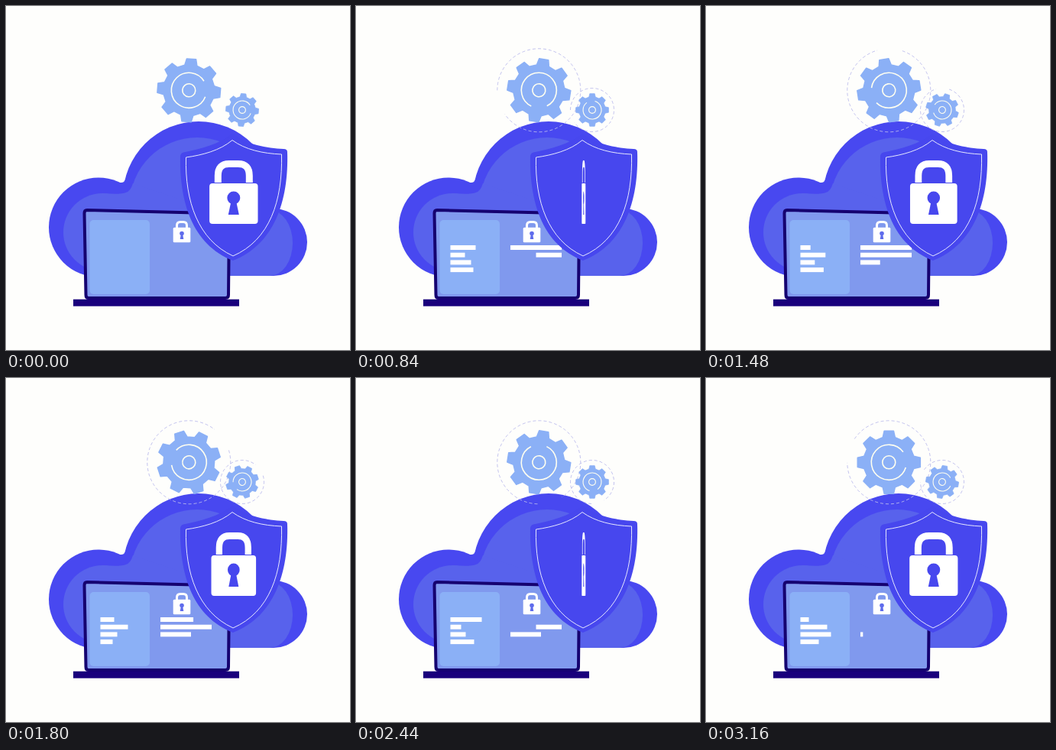
An HTML page that plays this animation: 450x450 px, repeating every 3200 ms.

```html
<!DOCTYPE html>
<html lang="en">
<head>
<meta charset="utf-8">
<title>Cloud security</title>
<style>
  html, body { margin: 0; width: 100%; height: 100%; overflow: hidden; background: #fefefc; }
  svg { display: block; width: 100vw; height: 100vh; }
</style>
</head>
<body>
<svg viewBox="0 0 450 450">
  <g fill="#4848f0">
    <circle cx="121" cy="289.500" r="65"/>
    <circle cx="252" cy="250" r="99"/>
    <circle cx="350" cy="309" r="44"/>
    <path d="M120 353V227Q147 231 151 231Q156 231 158 221L252 250L350 300V353Z"/>
  </g>
  <g fill="#5862ec">
    <circle cx="126" cy="296" r="51"/>
    <circle cx="250" cy="260" r="88"/>
    <ellipse cx="345" cy="310" rx="30" ry="43"/>
    <path d="M126 350V245Q150 247 157 244Q163 242 166 232L250 260L345 290V353H126Z"/>
  </g>

  <g id="gears"></g>

  <path d="M106 267L288 271.500Q292 271.500 292 276L291 378Q291 382 287 382H108Q104.500 382 104.500 378L102.500 271Q102.500 267 106 267Z"
        fill="#8099ee" stroke="#150070" stroke-width="4" stroke-linejoin="round"/>
  <rect x="109.500" y="280" width="78.500" height="97" rx="5" fill="#8bb0f6"/>
  <rect x="88" y="383.700" width="217" height="9" fill="#19007c"/>
  <g id="bars" fill="#fff"></g>
  <g fill="#fff">
    <rect x="218.700" y="289.700" width="22.600" height="19.600" rx="1.500"/>
    <path d="M223.500 291V287Q223.500 282.500 228 282.500H232Q236.500 282.500 236.500 287V291" fill="none" stroke="#fff" stroke-width="3"/>
    <g fill="#5f6cec"><circle cx="230" cy="297.500" r="2.800"/><path d="M229 298H231L232.300 305H227.700Z"/></g>
  </g>

  <path d="M296 167C279 181 254 187 232 191.500Q228 192.500 228 197C227 255 243 312 297 333C351 312 370 255 368 191Q368 187 363 187C342 186 314 181 296 167Z" fill="#4747ee"/>
  <path d="M296 175.500C280 189 257 195 235.500 198C234 255 251 306 297 327C345 306 362 255 360.500 194C336 193 313 188 296 175.500Z"
        fill="none" stroke="#e6e8ff" stroke-width="1"/>

  <g id="lock">
    <rect x="-31.700" y="232" width="63.400" height="53" rx="4" fill="#fff"/>
    <path d="M-20.500 231V222Q-20.500 206.500 -6 206.500H6Q20.500 206.500 20.500 222V231" fill="none" stroke="#fff" stroke-width="9"/>
    <g fill="#4747ee"><circle cy="251" r="8.500"/><path d="M-3 254H3L7 273H-7Z"/></g>
  </g>
</svg>
<script>
const LOOP = 3200, STEP = 40, GROW = 560;
const LOCK_X = 297.8;
const byId = id => document.getElementById(id);

function add(parent, tag, attrs) {
  const node = document.createElementNS("http://www.w3.org/2000/svg", tag);
  for (const key in attrs) node.setAttribute(key, attrs[key]);
  return parent.appendChild(node);
}

const clamp = x => Math.max(0, Math.min(1, x));
const ramp = (t, from, to) => clamp((t - from) / (to - from));

function polar(radius, degrees) {
  const a = degrees * Math.PI / 180;
  return (radius * Math.cos(a)).toFixed(2) + " " + (radius * Math.sin(a)).toFixed(2);
}

function arc(radius, start, sweep) {
  return `M${polar(radius, start)}A${radius} ${radius} 0 ${sweep > 180 ? 1 : 0} 1 ${polar(radius, start + sweep)}`;
}

function gearPath(outer, root, teeth) {
  const points = [];
  for (let i = 0; i < teeth; i++) {
    const mid = i * 360 / teeth - 90;
    points.push(polar(root, mid - 14), polar(outer, mid - 8.5), polar(outer, mid + 8.5), polar(root, mid + 14));
  }
  return "M" + points.join("L") + "Z";
}

function makeGear(x, y, scale, orbit, direction) {
  const group = add(byId("gears"), "g", { transform: `translate(${x} ${y})` });
  const dashes = add(group, "path", {
    fill: "none", stroke: "#bcbcec", "stroke-width": 0.9, "stroke-dasharray": "4 3"
  });
  const wheel = add(group, "g", {});
  add(wheel, "path", {
    d: gearPath(41.5 * scale, 33.5 * scale, 8), fill: "#8bb0f6",
    stroke: "#8bb0f6", "stroke-width": 1.5 * scale, "stroke-linejoin": "round"
  });
  const line = { fill: "none", stroke: "#fffff0", "stroke-width": scale < 1 ? 1.1 : 1.6 };
  add(wheel, "path", { d: arc(23 * scale, 17, 307), ...line });
  add(wheel, "circle", { r: 8.5 * scale, ...line });
  return { wheel, dashes, orbit, direction };
}

const gears = [
  makeGear(239.3, 110.3, 1, 54.5, 1),
  makeGear(309, 136, 0.52, 28.5, -1)
];

const bar = (x, y) => add(byId("bars"), "rect", { x, y, height: 6, width: 0 });

// Left column: bar lengths at the key times.
const keyTimes = [0, 280, 840, 1200, 1800, 2440, 3160, 3200];
const listBars = [
  [0, 20, 33, 9, 18, 41, 11, 9],
  [0, 6, 19, 30, 36, 14, 35, 36],
  [0, 14, 27, 16, 22, 20, 40, 41],
  [0, 9, 30, 43, 16, 31, 24, 23]
].map((lengths, i) => ({ node: bar(123.5, 313 + i * 9.7), lengths }));

// Right column: each line grows, holds, then shrinks.
const textBars = [
  { length: 67, grow: 0, shrink: 1600 },
  { length: 67, grow: 560, shrink: 2160, fromRight: true },
  { length: 40, grow: 1120, shrink: 2720, end: LOOP }
].map((line, i) => ({ ...line, node: bar(202, 313 + i * 9.7) }));

function keyed(t, values) {
  let i = 0;
  while (i < keyTimes.length - 2 && t >= keyTimes[i + 1]) i++;
  return values[i] + (values[i + 1] - values[i]) * ramp(t, keyTimes[i], keyTimes[i + 1]);
}

function draw(t) {
  const turn = t / LOOP * 360;
  byId("lock").setAttribute("transform", `translate(${LOCK_X} 0) scale(${Math.cos(turn * Math.PI / 180).toFixed(4)} 1)`);

  const reveal = ramp(t, 180, 840);
  const start = t < 840 ? 180 : 180 + (t - 840) * 0.17;
  for (const { wheel, dashes, orbit, direction } of gears) {
    wheel.setAttribute("transform", `rotate(${4.5 + direction * turn})`);
    dashes.setAttribute("d", reveal ? arc(orbit, start, 325 * reveal) : "");
  }

  for (const { node, lengths } of listBars) node.setAttribute("width", keyed(t, lengths));

  for (const { node, length, grow, shrink, end, fromRight } of textBars) {
    const width = length * (ramp(t, grow, grow + GROW) - ramp(t, shrink, end || shrink + GROW));
    node.setAttribute("width", width);
    if (fromRight) node.setAttribute("x", 202 + length - width);
  }
}

const begin = performance.now();
function tick() {
  const t = (performance.now() - begin) % LOOP;
  draw(Math.floor(t / STEP) * STEP);
  requestAnimationFrame(tick);
}
draw(0);
requestAnimationFrame(tick);
</script>
</body>
</html>
```
